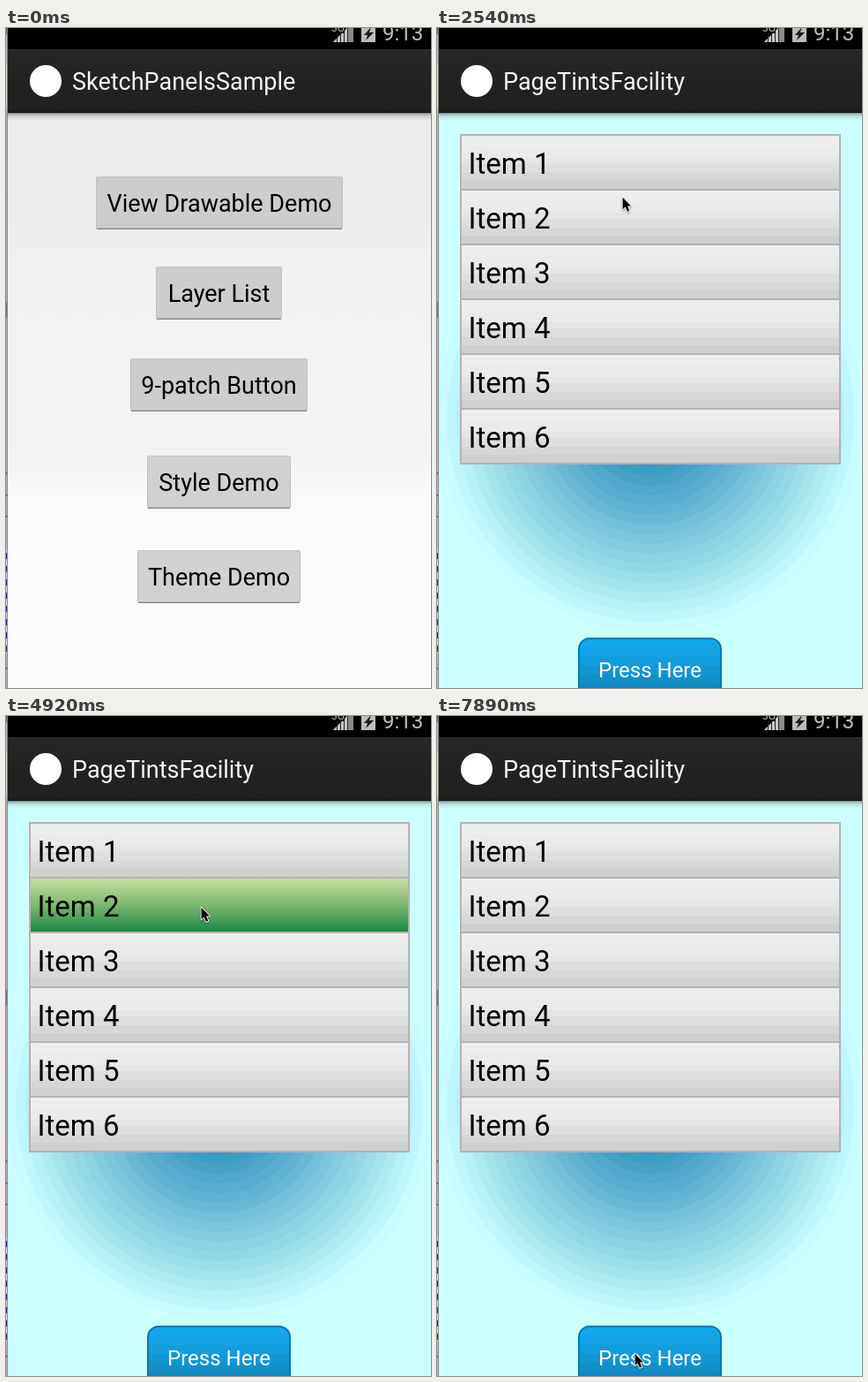
These frames come from a looping animation (482x747 px, 8000 ms). An HTML page with a canvas:

```html
<!DOCTYPE html>
<html lang="en">
<head>
<meta charset="utf-8">
<title>Button and list demo</title>
<style>
html, body { margin: 0; width: 482px; height: 747px; overflow: hidden; background: #000; }
canvas { display: block; }
</style>
</head>
<body>
<canvas id="stage" width="482" height="747"></canvas>
<script>
const W = 482, H = 747, LOOP = 8000, STEP = 147;
const FONT = 'Roboto, "Noto Sans", sans-serif';
const out = document.getElementById('stage').getContext('2d');

function layer(paint, h = 790) {
  const c = document.createElement('canvas');
  c.width = W;
  c.height = h;
  paint(c.getContext('2d'));
  return c;
}

function box(g, x, y, w, h, fill) {
  g.fillStyle = fill;
  g.fillRect(x, y, w, h);
}

function label(g, str, x, y, size, color, align = 'left') {
  g.font = size + 'px ' + FONT;
  g.textAlign = align;
  g.fillStyle = color;
  g.fillText(str, x, y);
}

function ramp(g, y0, y1, stops) {
  const grad = g.createLinearGradient(0, y0, 0, y1);
  stops.forEach(([at, color]) => grad.addColorStop(at, color));
  return grad;
}

// Flat bands: every colour holds until the next one begins.
function bands(g, y0, y1, list) {
  const stops = [];
  list.forEach(([at, color], i) => {
    stops.push([at, color], [i + 1 < list.length ? list[i + 1][0] : 1, color]);
  });
  return ramp(g, y0, y1, stops);
}

function poly(g, pts, fill) {
  g.beginPath();
  pts.forEach(([x, y]) => g.lineTo(x, y));
  g.closePath();
  g.fillStyle = fill;
  g.fill();
}

function actionBar(g, title) {
  box(g, 2, 96, 480, 9, ramp(g, 96, 105, [[0, 'rgba(0,0,0,.45)'], [.35, 'rgba(0,0,0,.13)'], [1, 'rgba(0,0,0,0)']]));
  box(g, 2, 24, 480, 72, ramp(g, 24, 96, [[0, '#272727'], [.5, '#222'], [1, '#202020']]));
  box(g, 2, 24, 480, 1, '#303030');
  box(g, 2, 95, 480, 1, '#0c0c0c');
  g.beginPath();
  g.arc(45, 60, 18, 0, 7);
  g.fillStyle = '#fff';
  g.fill();
  label(g, title, 75, 70, 27, '#f4f4f4');
}

function holoButton(g, x, y, w, text, pressed) {
  g.beginPath();
  g.roundRect(x, y, w, 60, 2);
  g.fillStyle = pressed ? '#8acbe4' : y > 450 ? '#d1d1d1' : '#cdcdcd';
  g.fill();
  box(g, x + 1, y, w - 2, 1, pressed ? '#9bd5ea' : '#c3c3c3');
  box(g, x, y + 1, 1, 57, pressed ? '#79bdd8' : '#c0c0c0');
  box(g, x + w - 1, y + 1, 1, 57, pressed ? '#79bdd8' : '#c0c0c0');
  box(g, x + 1, y + 58, w - 2, 1, pressed ? '#6fb4d0' : '#b4b4b4');
  box(g, x + 1, y + 59, w - 2, 1, pressed ? '#5798b2' : '#868686');
  label(g, text, x + w / 2, y + 40, 27, '#000', 'center');
}

function menuScreen(pressed) {
  return layer(g => {
    box(g, 2, 24, 480, 766, ramp(g, 96, 747, [
      [0, '#ebebeb'], [.19, '#ececec'], [.25, '#f1f1f1'],
      [.6, '#f3f3f3'], [.67, '#fbfbfb'], [1, '#fcfcfc']
    ]));
    actionBar(g, 'SketchPanelsSample');
    holoButton(g, 102, 168, 280, 'View Drawable Demo', pressed);
    holoButton(g, 170, 270, 143, 'Layer List');
    holoButton(g, 141, 374, 201, '9-patch Button');
    holoButton(g, 160, 484, 163, 'Style Demo');
    holoButton(g, 149, 591, 185, 'Theme Demo');
  });
}

function rings(g) {
  const inner = [15, 122, 176], outer = [204, 255, 255], n = 22;
  for (let i = n; i > 0; i--) {
    const k = (i - .5) / n;
    const mix = inner.map((c, j) => Math.round(c + (outer[j] - c) * k));
    g.beginPath();
    g.arc(242, 441, i * 11, 0, 7);
    g.fillStyle = `rgb(${mix})`;
    g.fill();
  }
}

function listScreen(active) {
  return layer(g => {
    g.beginPath();
    g.rect(2, 24, 480, 766);
    g.clip();
    box(g, 2, 24, 480, 766, '#ccffff');
    rings(g);
    actionBar(g, 'PageTintsFacility');
    box(g, 26, 120, 432, 374, '#b3b3b3');
    for (let i = 0; i < 6; i++) {
      const y = 122 + i * 62;
      const fill = i === active
        ? ramp(g, y, y + 60, [[0, '#c4df9b'], [.5, '#7cb870'], [1, '#1d8845']])
        : bands(g, y, y + 60, [[0, '#ededed'], [.2, '#eaeaea'], [.42, '#e5e5e5'], [.54, '#dedede'], [.7, '#d7d7d7'], [.85, '#d0d0d0']]);
      box(g, 28, y, 428, 60, fill);
      label(g, 'Item ' + (i + 1), 35.5, y + 43, 33, '#000');
    }
    g.beginPath();
    g.roundRect(161, 691, 161, 71, 12);
    g.fillStyle = bands(g, 690, 762, [
      [0, '#12a7ee'], [.15, '#12a3e7'], [.3, '#129dde'], [.44, '#1297d5'],
      [.58, '#1190ca'], [.72, '#1189c0'], [.86, '#1182b6']
    ]);
    g.fill();
    g.lineWidth = 2;
    g.strokeStyle = '#0877ad';
    g.stroke();
    label(g, 'Press Here', 241.5, 735, 24, '#fff', 'center');
  });
}

// Status bar and the sliver of window behind the left edge.
const chrome = layer(g => {
  box(g, 2, 0, 480, 24, '#000');
  poly(g, [[371, 16], [394, 16], [394, -7]], '#8a8a8a');
  poly(g, [[371, 16], [388, 16], [388, -1]], '#c6c6c6');
  for (let x = 375; x < 390; x += 4) box(g, x, 0, 1, 16, '#222');
  box(g, 368, 0, 16, 6, '#000');
  label(g, '3G', 369, 4, 12, '#bdbdbd');
  box(g, 403, -3, 16, 19, '#bcbcbc');
  poly(g, [[414, -1], [406, 8], [410, 8], [408, 14], [417, 5], [412, 5]], '#1c1c1c');
  label(g, '9:13', 427, 14, 24, '#bebebe');

  box(g, 0, 0, 2, H, '#b9b9b9');
  box(g, 0, 0, 1, 7, '#2c8a38');
  box(g, 0, 40, 1, 50, '#d8d8c4');
  box(g, 0, 310, 1, 18, '#777');
  for (const y of [503, 528, 552, 724]) box(g, 0, y, 1, 2, '#555');
  box(g, 0, 590, 2, 118, '#dcdce8');
  for (let y = 594; y < 705; y += 15) box(g, 0, y, 1, 7, '#2c2c9c');
  box(g, 1, 0, 1, H, '#858585');
}, H);

const menu = menuScreen(false), menuDown = menuScreen(true);
const list = listScreen(-1), listDown = [listScreen(0), listScreen(1)];

// start, steps, end x, end y
const glides = [
  [150, 1, 331, 221], [297, 2, 210, 191], [3590, 3, 221, 143],
  [4320, 3, 221, 216], [5068, 3, 219, 271], [5660, 3, 219, 337],
  [6260, 4, 227, 406], [7300, 5, 224, 721]
];

function pointerAt(t) {
  if (t < glides[0][0]) return null;
  let x = 0, y = 0;
  for (const [start, n, ex, ey] of glides) {
    if (t < start) break;
    const k = Math.min(n, Math.floor((t - start) / STEP) + 1);
    const e = 1 - Math.pow(1 - k / n, 2.7);
    x += (ex - x) * e;
    y += (ey - y) * e;
  }
  return [Math.round(x), Math.round(y)];
}

const arrow = new Path2D('M.6 .8V14.2L3.6 11.4L6 16.8L8.3 15.8L6 10.6H10Z');

function pointer(g, [x, y]) {
  g.save();
  g.translate(x, y);
  g.lineJoin = 'round';
  g.lineWidth = 1.8;
  g.strokeStyle = '#fff';
  g.shadowColor = 'rgba(0,0,0,.4)';
  g.shadowBlur = 2;
  g.shadowOffsetY = 1;
  g.stroke(arrow);
  g.shadowColor = 'transparent';
  g.fillStyle = '#000';
  g.fill(arrow);
  g.restore();
}

function draw(t) {
  const g = out;
  if (t < 2540) {
    g.drawImage(t >= 890 && t < 1190 ? menuDown : menu, 0, 0);
    if (t >= 2390) {
      box(g, 2, 24, 480, H, 'rgba(0,0,0,.33)');
      g.save();
      g.globalAlpha = .8;
      g.translate(242, 372);
      g.scale(.954, .954);
      g.drawImage(list, -242, -372);
      g.restore();
    }
  } else {
    const down = t >= 4180 && t < 4320 ? 0 : t >= 4920 && t < 5068 ? 1 : -1;
    g.drawImage(down < 0 ? list : listDown[down], 0, 0);
  }
  g.drawImage(chrome, 0, 0);
  const p = pointerAt(t);
  if (p) pointer(g, p);
}

const begin = performance.now();
function tick() {
  draw((performance.now() - begin) % LOOP);
  requestAnimationFrame(tick);
}
tick();
</script>
</body>
</html>
```
